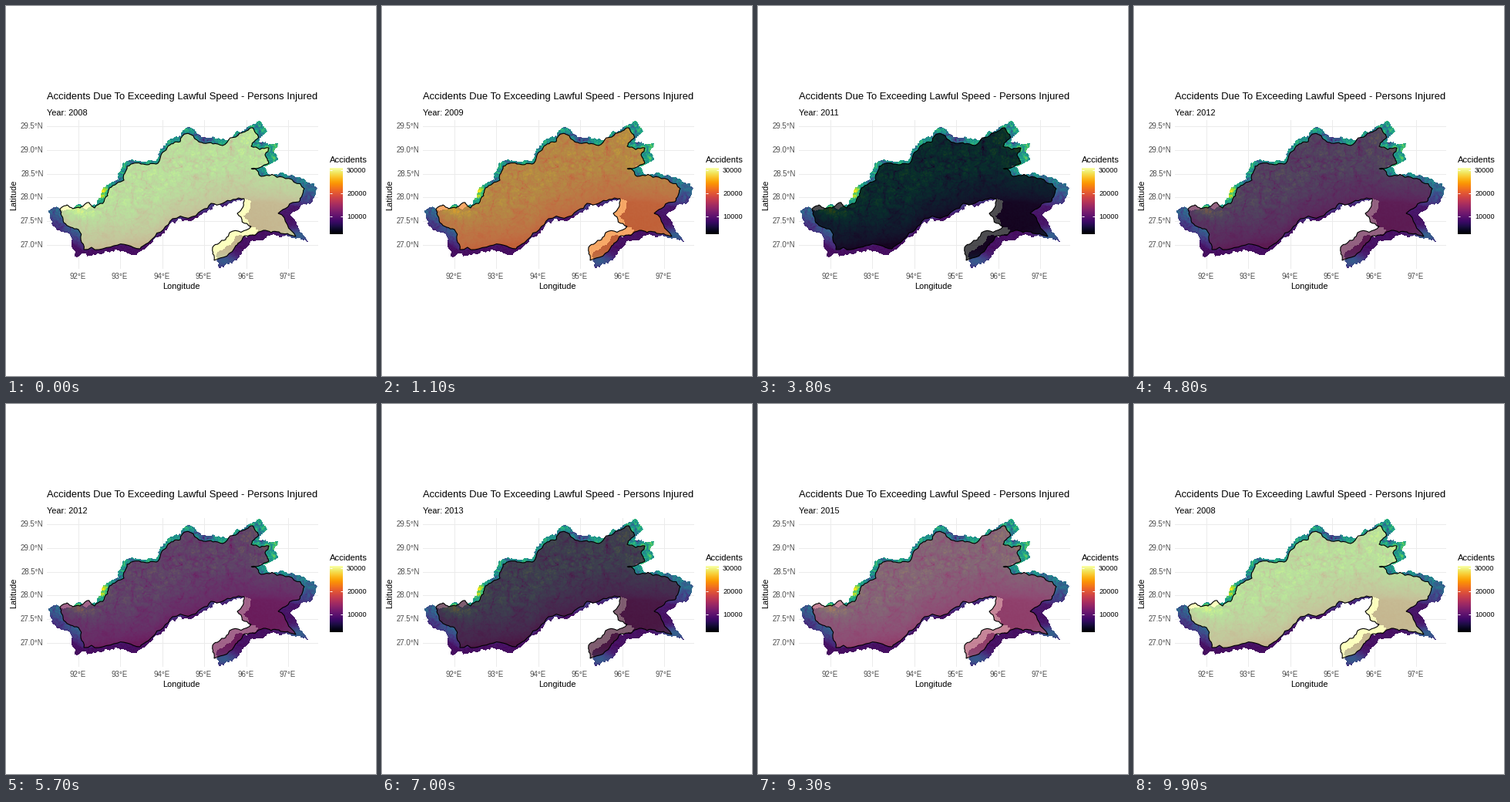
A matplotlib script that plays this animation: 480 px wide and 480 px high, repeating every 10 s.

```python
import numpy as np
import matplotlib.pyplot as plt
from matplotlib import colormaps
from matplotlib.animation import FuncAnimation
from matplotlib.colors import to_rgb
from matplotlib.patches import Polygon
from matplotlib.path import Path

SIZE, FRAMES, INTERVAL = 480, 100, 100
LEFT, RIGHT, TOP, BOTTOM = 53, 405, 148, 341
plt.rcParams["font.family"] = "Liberation Sans"
inferno, viridis = colormaps["inferno"], colormaps["viridis"]
rng = np.random.default_rng(8)

# Corners of the border in pixels, clockwise from the west
CORNERS = [
    (70, 263), (79, 258), (96, 262), (108, 255), (115, 262), (132, 246),
    (134, 236), (153, 226), (157, 208), (178, 205), (197, 204), (209, 184),
    (226, 176), (232, 166), (243, 168), (256, 178), (281, 181), (303, 165),
    (320, 158), (328, 170), (318, 182), (341, 184), (336, 193), (341, 204),
    (318, 211), (331, 221), (359, 222), (387, 237), (380, 254), (353, 269),
    (376, 299), (354, 293), (334, 291), (310, 298), (298, 311), (270, 330),
    (268, 313), (285, 303), (290, 294), (318, 286), (300, 269), (309, 250),
    (281, 256), (254, 265), (216, 276), (190, 302), (174, 315), (140, 311),
    (101, 316), (94, 290), (75, 281),
]


def roughen(points, levels, amount):
    """Break each edge at a randomly displaced midpoint."""
    for _ in range(levels):
        nxt = np.roll(points, -1, axis=0)
        edge = nxt - points
        normal = np.column_stack([-edge[:, 1], edge[:, 0]])
        shift = rng.uniform(-amount, amount, (len(points), 1))
        mid = (points + nxt) / 2 + normal * shift
        points = np.stack([points, mid], axis=1).reshape(-1, 2)
    return points


def noise(x, y, cell):
    """Smooth value noise in -1..1."""
    gx, gy = (x - LEFT) / cell, (y - TOP) / cell
    ix, iy = gx.astype(int), gy.astype(int)
    fx, fy = gx - ix, gy - iy
    fx, fy = fx * fx * (3 - 2 * fx), fy * fy * (3 - 2 * fy)
    g = rng.uniform(-1, 1, (iy.max() + 2, ix.max() + 2))
    upper = g[iy, ix] * (1 - fx) + g[iy, ix + 1] * fx
    lower = g[iy + 1, ix] * (1 - fx) + g[iy + 1, ix + 1] * fx
    return upper * (1 - fy) + lower * fy


def hill(x, y, cx, cy, rx, ry):
    return np.exp(-((x - cx) / rx) ** 2 - ((y - cy) / ry) ** 2)


def elevation(x, y):
    """Plains in the south, hills in the north, cut by river valleys."""
    foot = np.interp(x, [53, 100, 190, 215, 310, 345, 405],
                     [285, 318, 306, 283, 254, 254, 266])
    rise = np.clip((foot - y) / 58, 0, 1)
    v = 0.04 + 0.54 * rise ** 0.7
    for cell in (32, 20, 12, 7):
        n = noise(x, y, cell) + 0.35 * noise(x, y, cell / 3)
        v -= 0.16 * rise * np.exp(-(n / 0.11) ** 2)
    v += 0.08 * rise * noise(x, y, 5) + (0.02 + 0.08 * rise) * noise(x, y, 1.5)
    v += 0.42 * hill(x, y, 125, 242, 7, 8) + 0.3 * hill(x, y, 95, 267, 20, 9)
    v += 0.24 * hill(x, y, 282, 331, 20, 10) + 0.26 * hill(x, y, 380, 298, 18, 10)
    v += 0.12 * hill(x, y, 350, 200, 40, 50) - 0.25 * hill(x, y, 262, 172, 10, 6)
    return np.clip(v, 0, 1)


RGB_XYZ = np.array([[0.4124, 0.3576, 0.1805],
                    [0.2126, 0.7152, 0.0722],
                    [0.0193, 0.1192, 0.9505]])
WHITE = RGB_XYZ.sum(axis=1)


def rgb_to_lab(rgb):
    rgb = np.asarray(rgb)
    lin = np.where(rgb > 0.04045, ((rgb + 0.055) / 1.055) ** 2.4, rgb / 12.92)
    t = RGB_XYZ @ lin / WHITE
    f = np.where(t > 0.008856, np.cbrt(t), 7.787 * t + 16 / 116)
    return np.array([116 * f[1] - 16, 500 * (f[0] - f[1]), 200 * (f[1] - f[2])])


def lab_to_rgb(lab):
    fy = (lab[0] + 16) / 116
    f = np.array([fy + lab[1] / 500, fy, fy - lab[2] / 200])
    t = np.where(f > 0.2069, f ** 3, (f - 16 / 116) / 7.787)
    lin = np.clip(np.linalg.solve(RGB_XYZ, t * WHITE), 0, 1)
    rgb = np.where(lin > 0.0031308, 1.055 * lin ** (1 / 2.4) - 0.055, 12.92 * lin)
    return np.clip(rgb, 0, 1)


# Fill of each year and the frame at which it starts to fade into the next
FILLS = ["#FCFFA4", "#F37819", "#8F2A6C", "#000004",
         "#862462", "#3C162D", "#9F2D62", "#9F2D62"]
STARTS = [6, 18, 32, 44, 57, 70, 82, 93]
FADE = 6.5
LABS = [rgb_to_lab(to_rgb(c)) for c in FILLS]


def state_at(frame):
    """Current year index, next index and progress between them."""
    k = max(0, sum(frame >= s for s in STARTS) - 1)
    p = np.clip((frame - STARTS[k] + 1) / FADE, 0, 1)
    return k, (k + 1) % len(FILLS), p


fig = plt.figure(figsize=(4.8, 4.8), dpi=100, facecolor="white")
ax = fig.add_axes([0, 0, 1, 1])
ax.axis("off")


def label(x, y, text, px, color="black", **kw):
    return ax.text(x, y, text, fontsize=px * 0.72, color=color, **kw)


# Grid and axis labels
GREY = "#4D4D4D"
grid = dict(color="#EBEBEB", lw=0.72, zorder=0)
for k in range(6):
    x = round(93 + 54.4 * k) + 0.5
    y = int(155.6 + 30.7 * k) + 0.5
    ax.plot([x, x], [TOP, BOTTOM - 1], **grid)
    ax.plot([LEFT, RIGHT - 1], [y, y], **grid)
    label(x, 353.5, f"{92 + k}°E", 9.7, GREY, ha="center")
    label(48.5, y + 3.5, f"{29.5 - k / 2:.1f}°N", 9.7, GREY, ha="right")
label(227.5, 367, "Longitude", 11, ha="center")
label(10.5, 245, "Latitude", 11, ha="center", va="center", rotation=90)
label(53, 121, "Accidents Due To Exceeding Lawful Speed - Persons Injured", 13)
subtitle = label(53, 142, "", 11)

# Terrain: the same outline, slightly enlarged
border = roughen(np.array(CORNERS, float), 3, 0.17)
terrain = Path(roughen(border * (1.1, 1.1105) - (21.8, 26.5), 1, 0.4))
gx, gy = np.meshgrid(np.arange(LEFT, RIGHT) + 0.5, np.arange(TOP, BOTTOM) + 0.5)
inside = terrain.contains_points(np.column_stack([gx.ravel(), gy.ravel()]))
relief = viridis(elevation(gx, gy))
relief[..., 3] = inside.reshape(gx.shape)
ax.imshow(relief, extent=(LEFT, RIGHT, BOTTOM, TOP), interpolation="nearest",
          aspect="auto", zorder=2)

state = Polygon(border, closed=True, edgecolor="black", lw=0.8, zorder=3)
ax.add_patch(state)

# Colour bar
label(420, 203, "Accidents", 11.2)
bar = inferno(np.linspace(1, 0, 86))[:, None]
ax.imshow(bar, extent=(420, 437, 296, 210), interpolation="nearest",
          aspect="auto", zorder=2)
for k in range(3):
    y = int(212 + 30.4 * k) + 0.5
    for x in (420, 433.6):
        ax.plot([x, x + 3.4], [y, y], color="white", lw=0.72, zorder=3,
                solid_capstyle="butt")
    label(442, y + 3.5, str(30000 - 10000 * k), 9.2)

ax.set_xlim(0, SIZE)
ax.set_ylim(SIZE, 0)


def update(frame):
    now, then, p = state_at(frame)
    rgb = lab_to_rgb(LABS[now] * (1 - p) + LABS[then] * p)
    state.set_facecolor((*rgb, 0.7))
    subtitle.set_text(f"Year: {2008 + (then if p > 0.5 else now)}")
    return state, subtitle


anim = FuncAnimation(fig, update, frames=FRAMES, interval=INTERVAL, repeat=True)
plt.show()
```
